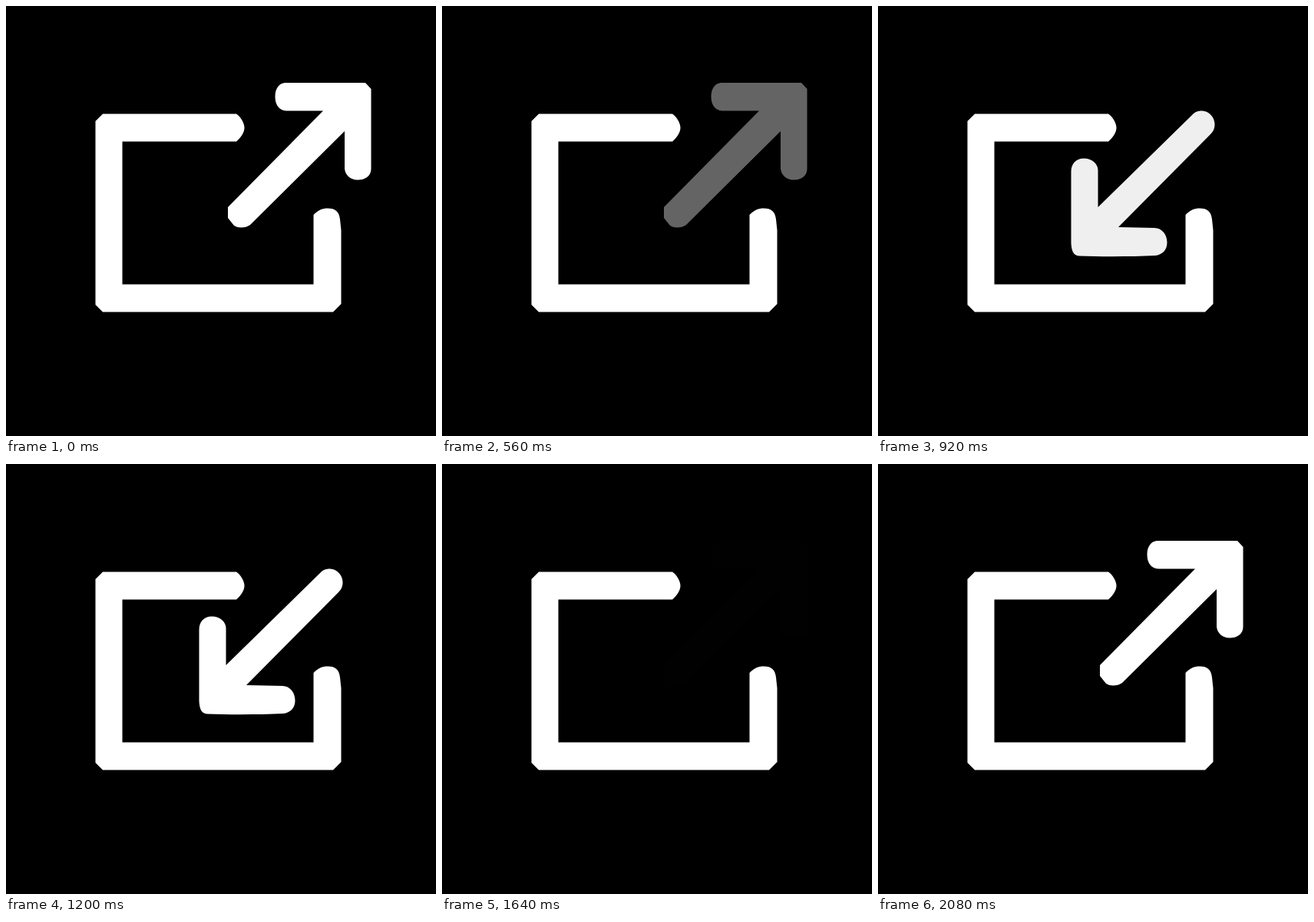
An HTML page for the animation above (2100 ms loop, 560 px wide and 560 px high).

```html
<!DOCTYPE html>
<html lang="en">
<head>
<meta charset="utf-8">
<title>Export and import icon</title>
<style>
  html, body {
    margin: 0;
    width: 100%;
    height: 100%;
    overflow: hidden;
    background: #000;
  }
  svg {
    display: block;
    width: 100%;
    height: 100%;
    fill: #fff;
  }
  .out { animation: out 2100ms linear infinite; }
  .in { animation: in 2100ms linear infinite; }

  /* Each arrow drops out quickly, then the other eases in */
  @keyframes out {
    0%, 20.952% { opacity: 1; }
    30.476%, 77.619% { opacity: 0; }
    78.095% { opacity: 0; animation-timing-function: cubic-bezier(.333, .667, .667, 1); }
    93.333%, 100% { opacity: 1; }
  }
  @keyframes in {
    0%, 30.476% { opacity: 0; }
    32.381% { opacity: 0; animation-timing-function: cubic-bezier(.333, .667, .667, 1); }
    47.619%, 71.429% { opacity: 1; }
    77.619%, 100% { opacity: 0; }
  }
</style>
</head>
<body>
<svg viewBox="0 0 560 560">
  <path d="M126 140.5H300C304 143 310.5 151 310.5 158.5S304 173 300 176.5H151.5V362.5H400.5V272C406 266 412 263.5 419 263.5C429 263.5 434 268 435 278L436.5 292V388L426 398.5H126L116.5 389V150Z"/>
  <path class="out" d="M363 100H468L475.5 108V212C475.5 222 467 226.5 458 226.5C448 226.5 442 220 441 212V163L318 285Q313 288.5 306 288.5Q301 288.5 297 286L289 276V262L413 136.5H365C355 136 350.5 128 350.5 118S355 101 363 100Z"/>
  <path class="in" d="M251.5 216C251.5 205 258 198.5 268 198.5C279 198.5 286.5 206 286.5 214V262L409 142C414 137 417 136.5 422 136.5C431 136.5 438.5 145 438.5 154C438.5 159 437 163 433 167L313 288L360 289C370 289 376.5 298 376.5 308C376.5 318 370 324 361 325C330 326.5 290 326.5 262 325.5C254 325 252 318 251.5 309Z"/>
</svg>
</body>
</html>
```
